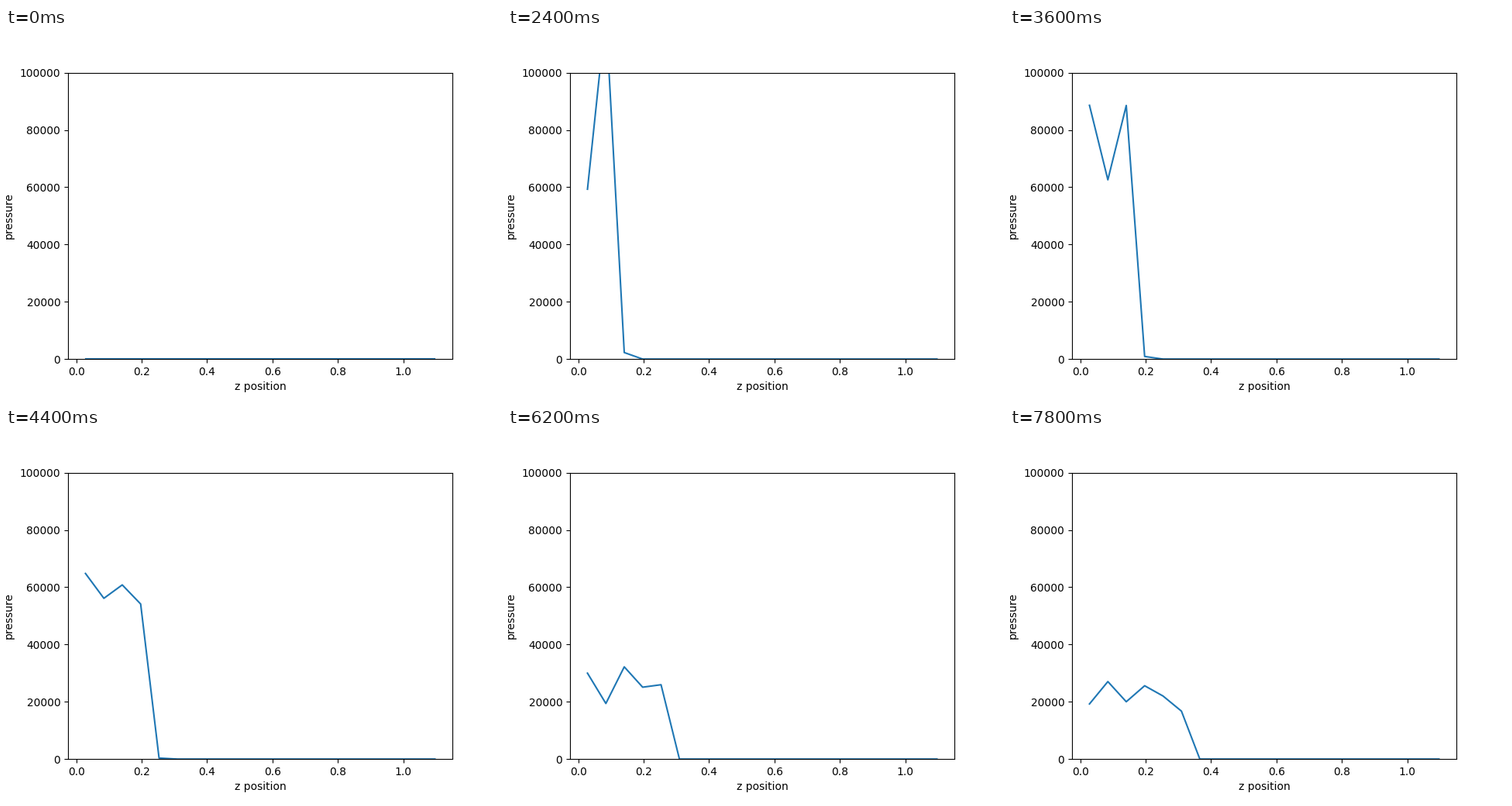
These frames come from a looping animation (640x480 px, 8000 ms). A matplotlib script:

```python
import numpy as np
import matplotlib.pyplot as plt
from matplotlib.animation import FuncAnimation

FRAMES = 40
CELLS = 20
DZ = 0.05625

# Key points of the pulse; pressures in thousands, front in cells
STEPS = [0, 7, 12, 18, 26, 31, 39]
BASE = [1000, 150, 90.7, 74.6, 47.8, 23.7, 23.25]
SWING = [0, 31, -31.4, 14, -6.8, 6.3, -4]
TILT = [0, 0, 0, 1.3, -4.6, 1.7, 0]
FRONT = [0, 1.035, 2.035, 3.013, 5, 4.8, 5.72]

cell = np.arange(CELLS)
z = (cell + 0.5) * DZ


def pressure(step):
    """Decaying pulse with a cell-to-cell ripple behind a moving front."""
    base, swing, tilt, front = (
        np.interp(step, STEPS, track) for track in (BASE, SWING, TILT, FRONT))
    ripple = swing * np.cos(0.9 * np.pi * cell)
    filled = np.clip(front - cell, 0, 1)
    return 1000 * (base + tilt * cell + ripple) * filled


fig, ax = plt.subplots(figsize=(6.4, 4.8), dpi=100)
line, = ax.plot(z, pressure(0), color="#1f77b4", lw=1.5)
ax.set_ylim(0, 100000)
ax.set_xlabel("z position")
ax.set_ylabel("pressure", labelpad=4.72)


def update(step):
    line.set_ydata(pressure(step))
    return line,


anim = FuncAnimation(fig, update, frames=FRAMES, interval=200,
                     repeat=True, repeat_delay=0)
plt.show()
```
